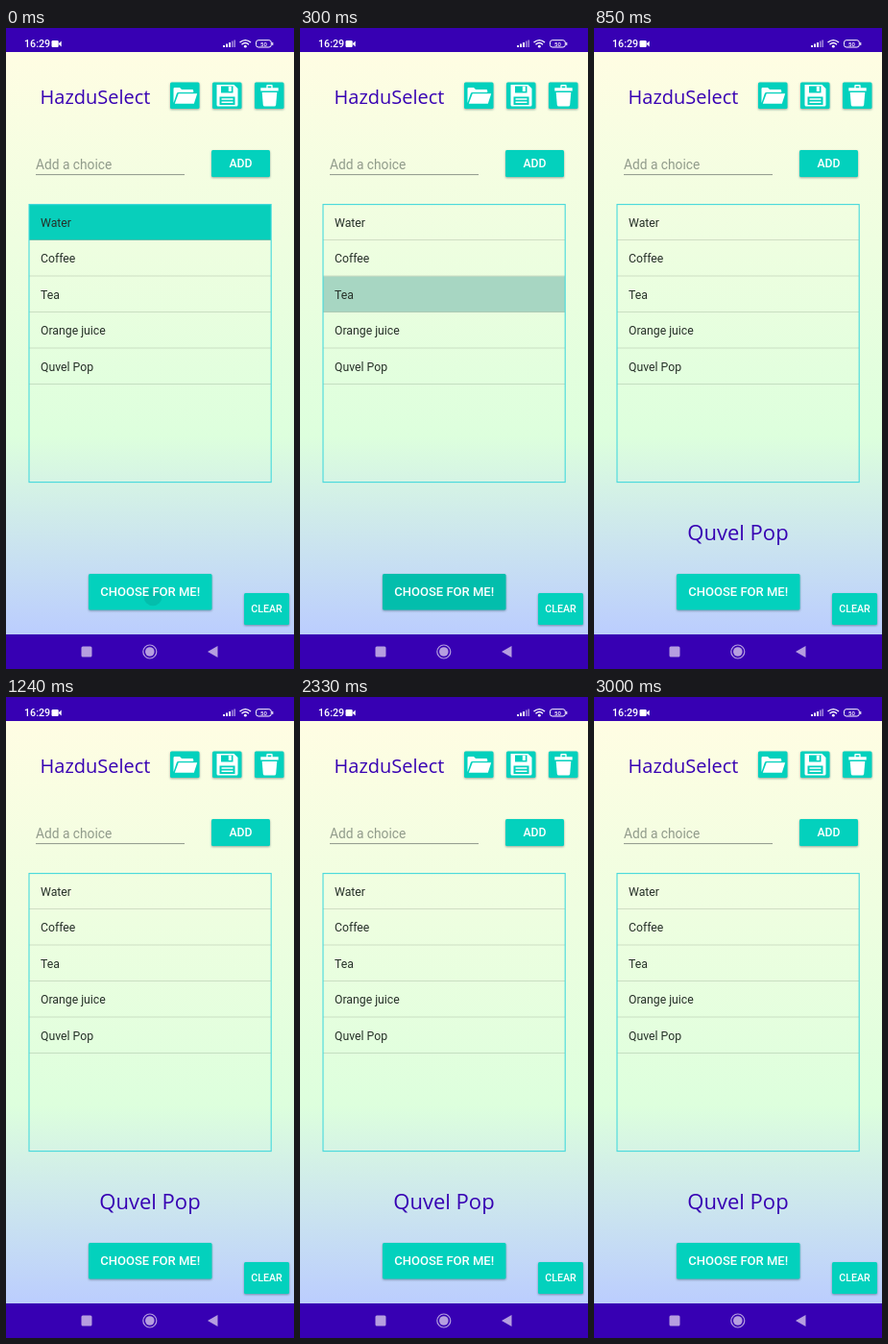
Animation, 300 px wide and 667 px high, one loop 3030 ms. Source, as an HTML page:

```html
<!DOCTYPE html>
<html lang="en">
<head>
<meta charset="utf-8">
<title>Random picker</title>
<style>
html, body { margin: 0; width: 100%; height: 100%; overflow: hidden; }
svg { display: block; width: 100%; height: 100%; font-family: Roboto, sans-serif; }
.display { font-family: "Open Sans", sans-serif; fill: #3700b3; }
.label { fill: #fff; font-weight: 500; text-anchor: middle; }
.row { font-size: 12.25px; fill: #263028; }
.button { fill: #03d1bd; filter: drop-shadow(0 1px 1px rgba(0, 40, 50, .4)); }
</style>
</head>
<body>
<svg id="stage" viewBox="0 0 300 667">
  <defs>
    <linearGradient id="sky" gradientUnits="userSpaceOnUse" x1="0" y1="25" x2="0" y2="631">
      <stop offset="0" stop-color="#fffde3"/>
      <stop offset=".66" stop-color="#ddffdd"/>
      <stop offset="1" stop-color="#bbcdfe"/>
    </linearGradient>
    <clipPath id="chooseArea"><rect x="86" y="568" width="128.5" height="37.5" rx="1.5"/></clipPath>
  </defs>
  <rect width="300" height="667" fill="url(#sky)"/>
  <path d="M0 0H300V25H0ZM0 631H300V667H0Z" fill="#3700b3"/>

  <g fill="#fff">
    <text x="19" y="20.3" font-size="10.7" font-weight="500">16:29</text>
    <rect x="47.5" y="13" width="7.2" height="7" rx="1.2"/>
    <path d="M54.5 16.5L57.7 13.5V19.5Z"/>
    <path d="M226 20V18H228V20ZM229 20V16.5H231V20ZM232 20V15H234V20Z"/>
    <path d="M235 20V13.5H236.6V20ZM237.4 20V12.5H239V20Z" opacity=".5"/>
    <g fill="none" stroke="#fff" stroke-width="1.4">
      <path d="M243.5 15Q249.3 10.2 255 15M245.5 17.2Q249.3 14 253 17.2"/>
      <rect x="260.5" y="12.7" width="15.8" height="7.3" rx="2.4" stroke-width="1"/>
    </g>
    <circle cx="249.3" cy="19.2" r="1.4"/>
    <path d="M277.2 15H278.3V18H277.2Z"/>
    <text class="label" x="268.4" y="18.6" font-size="6">50</text>
  </g>

  <text class="display" x="35.5" y="79" font-size="20">HazduSelect</text>
  <g id="buttons"></g>

  <g fill="#fff">
    <path d="M174.5 78V63.2Q174.5 62 175.7 62H181L183 64H194Q195.2 64 195.2 65.2V67H179.5Q178.3 67 177.8 68.3Z"/>
    <path d="M179.7 68.3H199.2L195.8 78.8H175.8Z"/>
    <path fill-rule="evenodd" d="M219.5 59H237.5L241.5 63V80Q241.5 81.5 240 81.5H221Q219.5 81.5 219.5 80ZM224 60.5V67.5H236.5V60.5ZM222.5 71.5V80H238.5V71.5Z"/>
    <path d="M231.8 60.8H234.8V66H231.8ZM224.5 73.2H236.5V74.7H224.5ZM224.5 76.4H236.5V77.9H224.5Z"/>
    <path d="M265.3 62.3H271.3V60Q271.3 59 272.3 59H276.7Q277.7 59 277.7 60V62.3H283.7V65.5H265.3ZM272.7 60.4V62.3H276.3V60.4Z" fill-rule="evenodd"/>
    <path d="M266.7 67H282.3L281.2 80Q281 81.5 279.5 81.5H269.5Q268 81.5 267.8 80Z"/>
  </g>

  <text x="31" y="147" font-size="13.75" fill="#919b8b">Add a choice</text>
  <path d="M31 152.6H186" stroke="#8e978a"/>

  <g id="highlight">
    <rect x="24" width="252" height="37" fill="#bcd6c2"/>
    <rect id="tint" x="24" width="252" height="37" fill="#08cfbb"/>
  </g>
  <g id="rows"></g>
  <rect x="24" y="183.6" width="252.2" height="289" fill="none" stroke="#45d9dc" stroke-width="1.1"/>

  <g id="press" clip-path="url(#chooseArea)"><circle id="ripple" cx="153" cy="592"/></g>
  <g id="labels"></g>
  <text id="result" class="display" x="150" y="533.3" font-size="22" text-anchor="middle">Quvel Pop</text>

  <g fill="#b69ee0">
    <rect x="78.5" y="643.5" width="11" height="11" rx="1.5"/>
    <circle cx="149.8" cy="649" r="4.8"/>
    <circle cx="149.8" cy="649" r="7" fill="none" stroke="#b69ee0" stroke-width="1.2"/>
    <path d="M210 649L220.5 643V655Z"/>
  </g>
</svg>
<script>
const LOOP = 3030;
const ROW_TOP = 183.5, ROW_STEP = 37.5;
const ROW_STARTS = [-100, 195, 290, 385, 480];
const PICK_END = 640;
const choices = ["Water", "Coffee", "Tea", "Orange juice", "Quvel Pop"];

const $ = id => document.getElementById(id);
const clamp = v => Math.max(0, Math.min(1, v));

function add(parent, tag, attrs, text = "") {
  const el = document.createElementNS("http://www.w3.org/2000/svg", tag);
  for (const key in attrs) el.setAttribute(key, attrs[key]);
  el.textContent = text;
  $(parent).append(el);
}

function addButton(x, y, width, height, text, size) {
  add("buttons", "rect", { class: "button", x, y, width, height, rx: 1.5 });
  if (text) add("labels", "text", {
    class: "label", x: x + width / 2, y: y + height / 2 + size * 0.36, "font-size": size
  }, text);
}

for (const x of [171, 215, 259]) addButton(x, 56.5, 30.5, 27.5);
addButton(214, 127, 61, 28, "ADD", 12.2);
addButton(86, 568, 128.5, 37.5, "CHOOSE FOR ME!", 13);
addButton(248, 588, 47, 33, "CLEAR", 10.7);

choices.forEach((choice, i) => {
  const y = ROW_TOP + i * ROW_STEP;
  add("rows", "text", { class: "row", x: 36, y: y + 23.1 }, choice);
  add("rows", "path", { d: `M24 ${y + 37}H276`, stroke: "#000", "stroke-opacity": 0.13 });
});

function draw(t) {
  const row = ROW_STARTS.findLastIndex(start => t >= start);
  const picking = t < PICK_END;
  $("highlight").setAttribute("transform", `translate(0 ${ROW_TOP + row * ROW_STEP})`);
  $("highlight").setAttribute("opacity", picking ? 1 : 0);
  $("tint").setAttribute("opacity", clamp((t - ROW_STARTS[row]) / 100));
  $("result").setAttribute("opacity", picking ? 0 : 1);
  $("ripple").setAttribute("r", 9 + 75 * clamp(t / 225));
  $("press").setAttribute("opacity", 0.09 * clamp((760 - t) / 460));
}

function tick(now) {
  draw(now % LOOP);
  requestAnimationFrame(tick);
}
draw(0);
requestAnimationFrame(tick);
</script>
</body>
</html>
```
